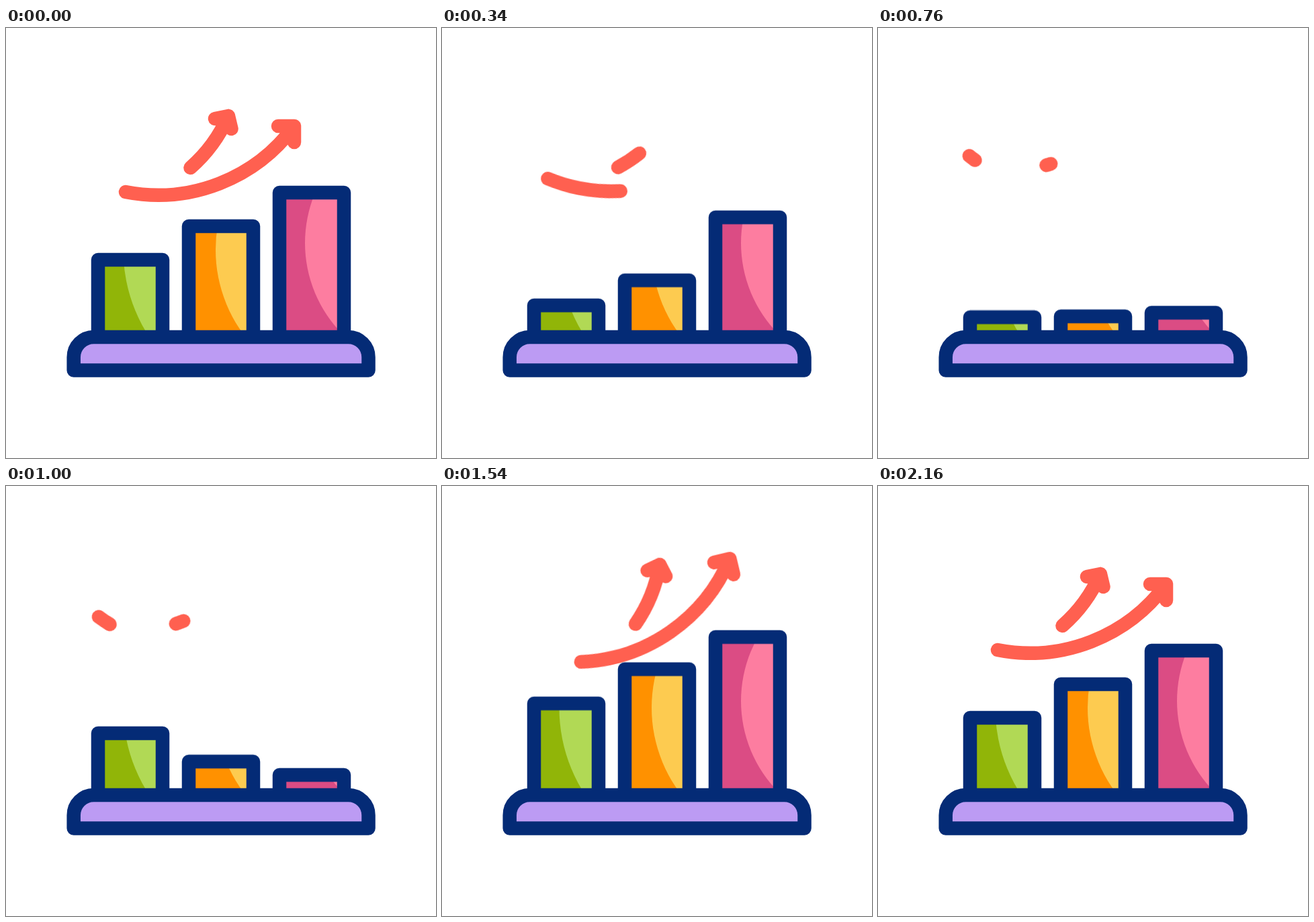
An HTML page without scripts for the animation above (2420 ms loop, 640 by 640 pixels).

```html
<!DOCTYPE html>
<html lang="en">
<head>
<meta charset="utf-8">
<title>Growing bar chart</title>
<style>
html, body { margin: 0; width: 100%; height: 100%; overflow: hidden; background: #fff; }
svg { display: block; width: 100vw; height: 100vh; }

.line { fill: none; stroke: #042b76; stroke-width: 20.5; stroke-linejoin: round; }
.arrow {
  fill: none; stroke: #ff6050; stroke-width: 20.5;
  stroke-linecap: round; stroke-linejoin: round;
  stroke-dasharray: 1 2;
}
.move, .turn, .arrow { animation: 2420ms infinite; }

/* Bars share one motion: --drop is the depth, --wait the stagger */
.move { animation-name: bar; animation-delay: var(--wait); }
@keyframes bar {
  0% { transform: translateY(0); animation-timing-function: cubic-bezier(.34, 0, .05, 1); }
  32.23% { transform: translateY(var(--drop)); animation-timing-function: cubic-bezier(.38, 0, .05, 1.06); }
  61.98% { transform: translateY(-22px); animation-timing-function: cubic-bezier(.34, 0, .3, 1); }
  80.99%, 100% { transform: translateY(0); }
}

.long { transform-origin: 268px 130px; animation-name: swing-long; }
@keyframes swing-long {
  0% { transform: rotate(0deg); animation-timing-function: cubic-bezier(.33, 0, .67, 1); }
  31.8% { transform: rotate(27.2deg); animation-timing-function: cubic-bezier(.83, 0, .51, 1); }
  66.94% { transform: rotate(-14deg); animation-timing-function: cubic-bezier(.33, 0, .5, 1); }
  89.26%, 100% { transform: rotate(0deg); }
}
.long .arrow { animation-name: trim-long; }
@keyframes trim-long {
  0%, 1.65% { stroke-dashoffset: 0; animation-timing-function: cubic-bezier(.28, 0, .16, 1); }
  32.23%, 34.71% { stroke-dashoffset: .97; animation-timing-function: cubic-bezier(.88, 0, .7, 1); }
  63.64%, 100% { stroke-dashoffset: 0; }
}

.short { transform-origin: 271px 152px; animation-name: swing-short; }
@keyframes swing-short {
  0% { transform: rotate(0deg); animation-timing-function: cubic-bezier(.33, 0, .5, 1); }
  31.8% { transform: rotate(25deg); animation-timing-function: cubic-bezier(.72, 0, .5, 1); }
  66.94% { transform: rotate(-14.6deg); animation-timing-function: cubic-bezier(.33, 0, .5, 1); }
  89.26%, 100% { transform: rotate(0deg); }
}
.short .arrow { animation-name: trim-short; }
@keyframes trim-short {
  0% { stroke-dashoffset: 0; animation-timing-function: cubic-bezier(.34, 0, .05, 1); }
  32.23%, 34.71% { stroke-dashoffset: .955; animation-timing-function: cubic-bezier(.79, 0, .7, 1); }
  63.64%, 100% { stroke-dashoffset: 0; }
}
</style>
</head>
<body>
<svg viewBox="0 0 640 640" xmlns="http://www.w3.org/2000/svg">
  <clipPath id="above"><rect width="640" height="460"/></clipPath>

  <g class="turn long">
    <path class="arrow" pathLength="1" d="M178 244A251.5 251.5 0 0 0 429 146H405H429V170"/>
  </g>
  <g class="turn short">
    <path class="arrow" pathLength="1" d="M274.5 208Q311 176 331 131L311 135L331 131L335.5 150"/>
  </g>

  <g clip-path="url(#above)">
    <g style="--drop:85.5px;--wait:0ms">
      <clipPath id="low"><rect class="move" x="137" y="345" width="96" height="150"/></clipPath>
      <g clip-path="url(#low)">
        <rect x="137" y="300" width="96" height="160" fill="#91b508"/>
        <circle cx="412.3" cy="330" r="237.8" fill="#b1d955"/>
      </g>
      <path class="line move" d="M137 500V345H233V500"/>
    </g>
    <g style="--drop:135.5px;--wait:100ms">
      <clipPath id="mid"><rect class="move" x="272" y="295" width="96" height="200"/></clipPath>
      <g clip-path="url(#mid)">
        <rect x="272" y="250" width="96" height="210" fill="#ff9100"/>
        <circle cx="524" cy="330" r="212" fill="#fdcb50"/>
      </g>
      <path class="line move" d="M272 500V295H368V500"/>
    </g>
    <g style="--drop:185.5px;--wait:200ms">
      <clipPath id="high"><rect class="move" x="407" y="245" width="96" height="250"/></clipPath>
      <g clip-path="url(#high)">
        <rect x="407" y="200" width="96" height="260" fill="#db4c84"/>
        <circle cx="637.5" cy="320" r="192.5" fill="#fd7da0"/>
      </g>
      <path class="line move" d="M407 500V245H503V500"/>
    </g>
  </g>

  <path class="line" style="fill:#bc9bf3" d="M100.7 509.4V490A30 30 0 0 1 130.7 460H509.5A30 30 0 0 1 539.5 490V509.4Z"/>
</svg>
</body>
</html>
```
